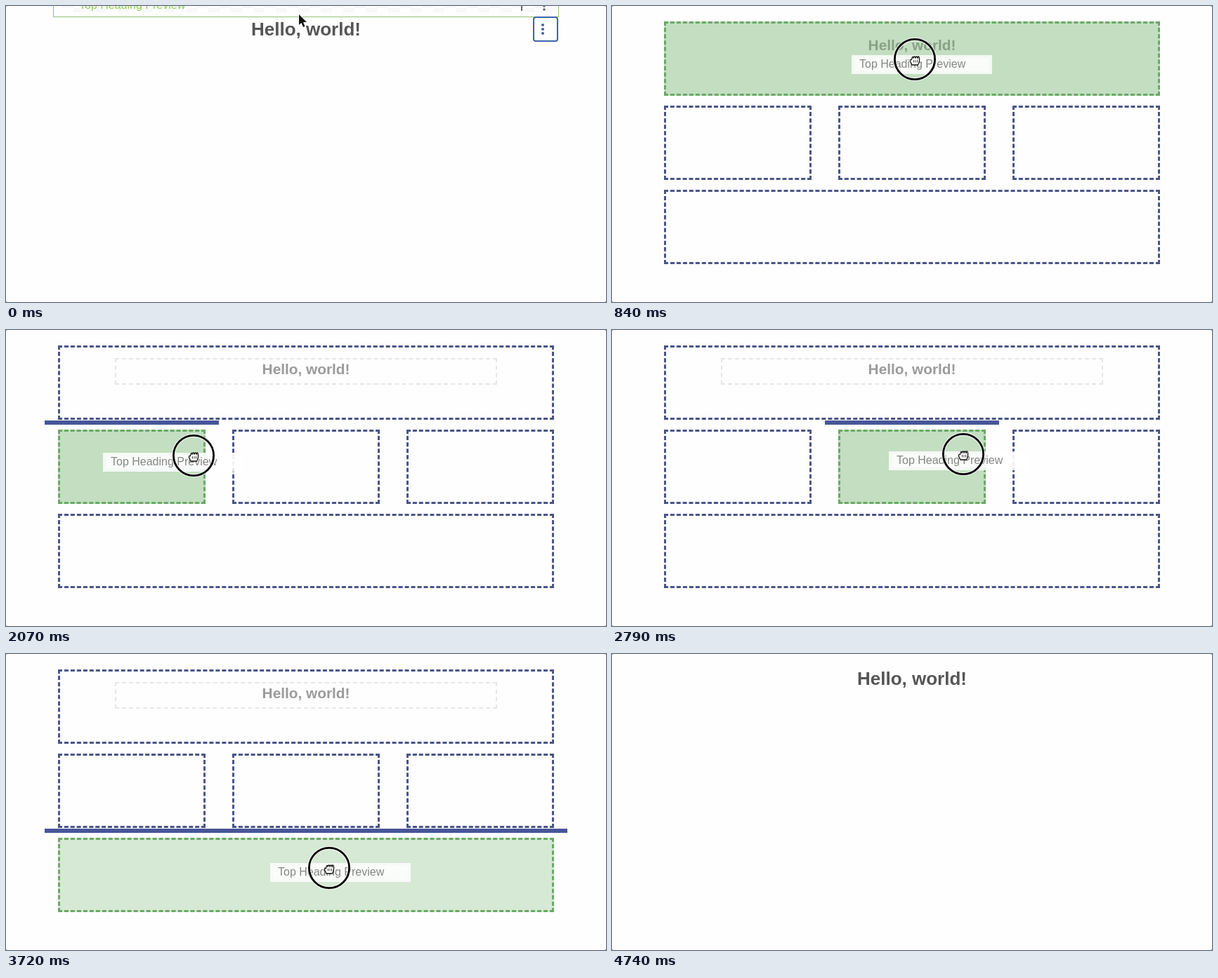
Write an HTML page with a canvas that moves like this. It is 854 px wide and 422 px high and loops after 5.1 s.

```html
<!DOCTYPE html>
<html lang="en">
<head>
<meta charset="utf-8">
<title>Drag and drop layout</title>
<style>
html, body { margin: 0; width: 100%; height: 100%; overflow: hidden; background: #fefefe; }
canvas { display: block; }
</style>
</head>
<body>
<canvas id="stage" width="854" height="422"></canvas>
<script>
const ctx = document.getElementById('stage').getContext('2d');
const W = 854, H = 422, LOOP = 5100, STEP = 30;
const LABEL = 'Top Heading Preview';
const BLUE = '#4a5488', GREEN = '#6aa866', BAR = '#475699';
const DROP = 4320;

// Drop zones: outer rectangle and the times the pointer is over it.
const zones = [
  { x: 74, y: 22, w: 706, h: 106, enter: 480, leave: 1230 },
  { x: 74, y: 142, w: 210, h: 106, enter: 1510, leave: 2110 },
  { x: 322, y: 142, w: 210, h: 106, enter: 2130, leave: 2870 },
  { x: 570, y: 142, w: 210, h: 106, enter: 2880, leave: 3440 },
  { x: 74, y: 262, w: 706, h: 106, enter: 3580, leave: DROP }
];

// Insertion bar: from, to, x, y, width.
const bars = [
  [1510, 1760, 55, 255, 248],
  [1760, 2130, 55, 129, 248],
  [2130, 2300, 303, 129, 248],
  [2300, 2520, 303, 255, 248],
  [2520, 2880, 303, 129, 248],
  [2880, 3510, 551, 129, 248],
  [3580, DROP, 55, 249, 744]
];

// Pointer path: time, x, y.
const path = [
  [0, 417, 12], [120, 417, 14], [300, 420, 45], [540, 431, 75],
  [840, 431, 76], [1080, 428, 78], [1260, 290, 118], [1430, 210, 158],
  [1530, 205, 164], [1700, 180, 190], [1850, 195, 190], [1970, 228, 181],
  [2070, 267, 179], [2200, 335, 185], [2400, 500, 205], [2560, 470, 195],
  [2690, 484, 179], [2790, 500, 177], [2950, 640, 190], [3150, 680, 185],
  [3330, 680, 185], [3520, 500, 285], [3620, 466, 304], [3720, 460, 305],
  [3850, 458, 306], [DROP, 458, 306], [4480, 460, 330], [4700, 475, 450]
];

const clamp = v => Math.max(0, Math.min(1, v));
const lerp = (a, b, k) => a + (b - a) * k;
const ramp = (t, from, to) => clamp((t - from) / (to - from));
const smooth = (t, from, to) => { const k = ramp(t, from, to); return k * k * (3 - 2 * k); };
const easeOut = (t, from, to) => 1 - (1 - ramp(t, from, to)) ** 2;

// Slope at a path point; zero at turning points so nothing overshoots.
function slope(i, axis) {
  if (i === 0 || i === path.length - 1) return 0;
  const [a, b, c] = [path[i - 1], path[i], path[i + 1]];
  const before = (b[axis] - a[axis]) / (b[0] - a[0]);
  const after = (c[axis] - b[axis]) / (c[0] - b[0]);
  return before * after <= 0 ? 0 : 2 * before * after / (before + after);
}

function pointer(t) {
  t = Math.max(0, Math.min(t, path[path.length - 1][0]));
  let i = 0;
  while (i < path.length - 2 && path[i + 1][0] <= t) i++;
  const a = path[i], b = path[i + 1], span = b[0] - a[0], k = (t - a[0]) / span;
  const at = axis =>
    a[axis] * (2 * k ** 3 - 3 * k * k + 1) + b[axis] * (3 * k * k - 2 * k ** 3) +
    span * (slope(i, axis) * (k ** 3 - 2 * k * k + k) + slope(i + 1, axis) * (k ** 3 - k * k));
  return { x: at(1), y: at(2) };
}

function faded(alpha, draw) {
  if (alpha <= 0) return;
  ctx.save();
  ctx.globalAlpha *= alpha;
  draw();
  ctx.restore();
}

function text(string, x, y, size, color, style = '') {
  ctx.font = `${style} ${size}px "Liberation Sans", Arial, sans-serif`;
  ctx.fillStyle = color;
  ctx.fillText(string, x, y);
}

function dot(x, y, r) {
  ctx.beginPath();
  ctx.arc(x, y, r, 0, Math.PI * 2);
  ctx.fill();
}

// Each side starts and ends with a whole dash.
function dashedSide(x1, y1, x2, y2, dash, gap) {
  const length = Math.hypot(x2 - x1, y2 - y1);
  const count = Math.round((length + gap) / (dash + gap));
  ctx.setLineDash([dash, (length - count * dash) / (count - 1)]);
  ctx.beginPath();
  ctx.moveTo(x1, y1);
  ctx.lineTo(x2, y2);
  ctx.stroke();
}

function dashedBox(x, y, w, h, line, dash, gap, color) {
  const d = line / 2, r = x + w, b = y + h;
  ctx.save();
  ctx.strokeStyle = color;
  ctx.lineWidth = line;
  dashedSide(x, y + d, r, y + d, dash, gap);
  dashedSide(x, b - d, r, b - d, dash, gap);
  dashedSide(x + d, y, x + d, b, dash, gap);
  dashedSide(r - d, y, r - d, b, dash, gap);
  ctx.restore();
}

function drawToolbar() {
  ctx.fillStyle = '#f8f8f8';
  for (let x = 80; x < 780; x += 32) {
    ctx.fillRect(x, 0, 16, 3);
    ctx.fillRect(x + 16, 3, 16, 6);
  }
  ctx.fillStyle = '#93c572';
  ctx.fillRect(67, 0, 1, 15);
  ctx.fillRect(786, 0, 1, 15);
  ctx.fillRect(67, 15, 720, 1);
  text(LABEL, 104, 4, 16, '#92d050');
  ctx.fillStyle = '#666';
  ctx.fillRect(733, 0, 2, 7);
  dot(766, 0, 1.8);
  dot(766, 5, 1.8);
  ctx.strokeStyle = ctx.fillStyle = '#3f63ac';
  ctx.lineWidth = 2;
  ctx.beginPath();
  ctx.roundRect(751, 16, 34, 34, 3);
  ctx.stroke();
  for (const y of [27, 33, 39]) dot(764, y, 2);
}

function drawHeading(t) {
  const drag = t < DROP ? smooth(t, 60, 420) : 1 - smooth(t, 4380, 4740);
  const rest = t < DROP ? 42 : 44;
  faded(lerp(1, 0.59, drag), () => {
    ctx.textAlign = 'center';
    text('Hello, world!', 427, lerp(rest, 63, drag), lerp(26, 20.8, drag), '#555', 'bold');
  });
}

function drawZones(t) {
  const shown = smooth(t, 180, 540), zoom = lerp(1.025, 1, shown);
  faded(shown * (1 - ramp(t, 4350, 4590)), () => {
    ctx.translate(427, 148 + 15 * (1 - shown));
    ctx.scale(zoom, zoom);
    ctx.translate(-427, -148);
    faded(ramp(t, 1110, 1320), () => dashedBox(155, 40, 544, 38, 2, 6, 4, '#e6e6e6'));
    for (const z of zones) {
      const over = t >= z.enter && t < z.leave;
      const fill = easeOut(t, z.enter + 20, z.enter + 300) * (1 - easeOut(t, z.leave, z.leave + 240));
      faded(fill * 0.4, () => {
        ctx.fillStyle = '#6aad62';
        ctx.fillRect(z.x, z.y, z.w, z.h);
      });
      dashedBox(z.x, z.y, z.w, z.h, 3, 6, 3, over ? GREEN : BLUE);
    }
  });
}

function drawBar(t) {
  const bar = bars.find(([from, to]) => t >= from && t < to);
  if (!bar) return;
  ctx.fillStyle = BAR;
  ctx.fillRect(bar[2], bar[3], bar[4], 6);
}

// The dragged label trails the pointer slightly.
function drawLabel(t) {
  const p = pointer(t - 100), x = Math.round(p.x - 90), y = Math.round(p.y - 6);
  faded(ramp(t, 210, 330) * (1 - ramp(t, DROP, 4410)), () => {
    ctx.fillStyle = 'rgba(255,255,255,.82)';
    ctx.fillRect(x, y, 200, 27);
    ctx.fillStyle = 'rgba(255,255,255,.6)';
    ctx.fillRect(x + 5, y + 4, 190, 19);
    text(LABEL, x + 11, y + 18, 16, '#848784');
  });
}

function drawArrow(x, y) {
  ctx.save();
  ctx.translate(x, y);
  ctx.beginPath();
  ctx.moveTo(0, 0);
  for (const [px, py] of [[0, 15], [3.5, 12], [6, 18], [8.5, 17], [6, 11], [11, 11]]) ctx.lineTo(px, py);
  ctx.closePath();
  ctx.strokeStyle = '#fff';
  ctx.lineWidth = 2;
  ctx.stroke();
  ctx.fillStyle = '#111';
  ctx.fill();
  ctx.restore();
}

function drawFist(x, y) {
  ctx.save();
  ctx.translate(x, y);
  ctx.beginPath();
  ctx.moveTo(-4, 6);
  ctx.lineTo(-6.5, 1);
  ctx.quadraticCurveTo(-7, -2, -4.5, -1.5);
  for (const fx of [-4.5, -1.5, 1.5, 4]) ctx.quadraticCurveTo(fx + 1, -8, fx + 2.5, -4);
  ctx.quadraticCurveTo(7, 2, 4.5, 6);
  ctx.closePath();
  ctx.fillStyle = '#fff';
  ctx.fill();
  ctx.strokeStyle = '#111';
  ctx.lineWidth = 1.3;
  ctx.stroke();
  ctx.lineWidth = 0.8;
  for (const fx of [-1.5, 1, 3.5]) {
    ctx.beginPath();
    ctx.moveTo(fx, -1);
    ctx.lineTo(fx, 2.5);
    ctx.stroke();
  }
  ctx.restore();
}

function drawRing(x, y, r) {
  ctx.beginPath();
  ctx.arc(x, y, r, 0, Math.PI * 2);
  ctx.strokeStyle = 'rgba(255,255,255,.75)';
  ctx.lineWidth = 5;
  ctx.stroke();
  ctx.strokeStyle = '#000';
  ctx.lineWidth = 2.8;
  ctx.stroke();
}

function drawPointer(t) {
  const { x, y } = pointer(t);
  if (t >= 150 && t < DROP) drawFist(x, y + 2);
  else drawArrow(x, y);
  faded(ramp(t, 90, 210) * (1 - ramp(t, DROP, 4470)), () => drawRing(x, y, 28.6));
}

function drawCorners() {
  ctx.fillStyle = '#777';
  for (const x of [0, W - 1]) for (const y of [0, H - 1]) ctx.fillRect(x, y, 1, 1);
}

function render(t) {
  ctx.fillStyle = '#fefefe';
  ctx.fillRect(0, 0, W, H);
  ctx.textAlign = 'left';
  faded(1 - ramp(t, 60, 180), drawToolbar);
  drawHeading(t);
  ctx.textAlign = 'left';
  drawZones(t);
  drawBar(t);
  drawLabel(t);
  drawPointer(t);
  drawCorners();
}

const start = performance.now();
function tick() {
  const t = (performance.now() - start) % LOOP;
  render(t - t % STEP);
  requestAnimationFrame(tick);
}
tick();
</script>
</body>
</html>
```
